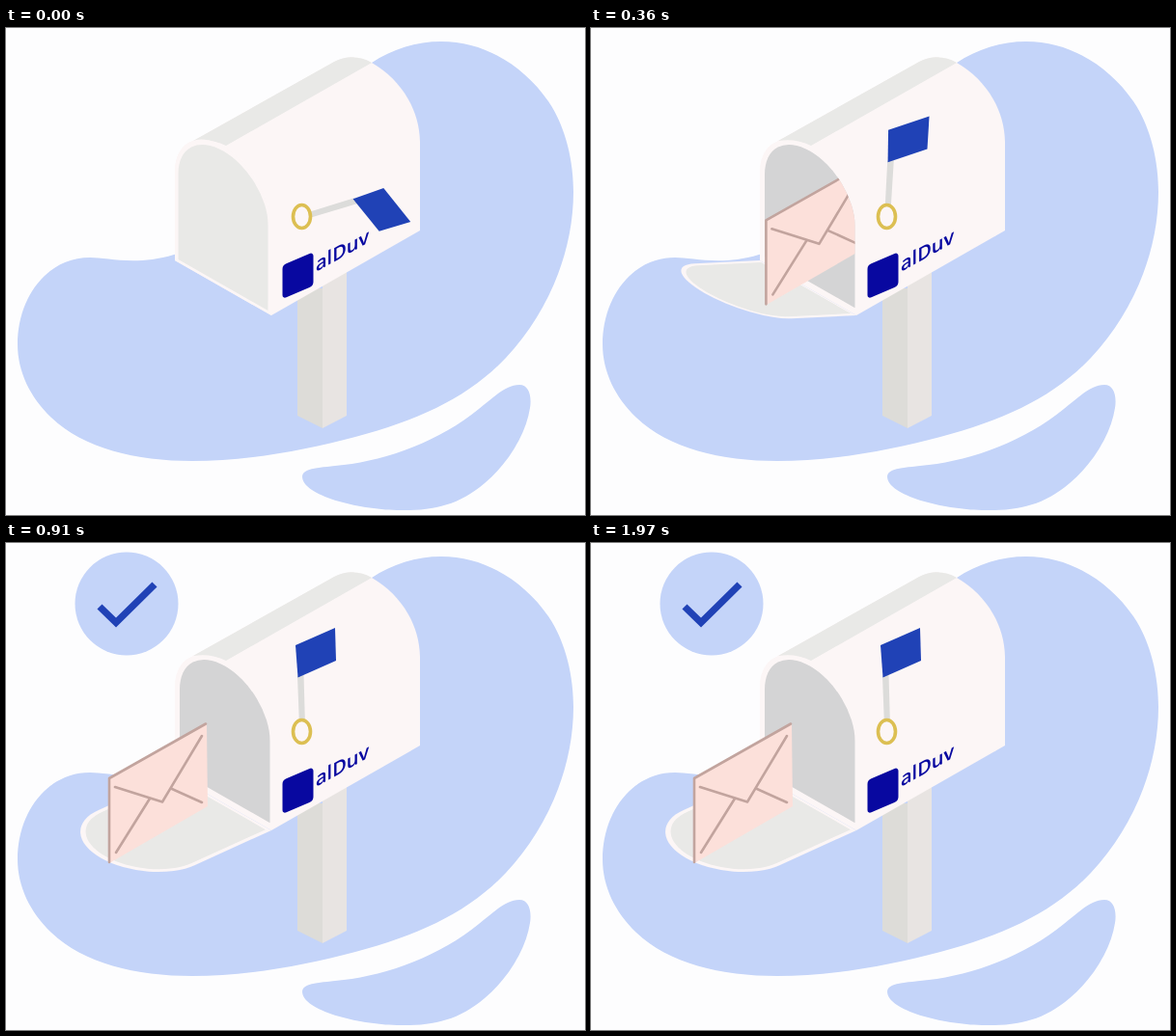
An HTML page that plays this animation: 600 by 505 pixels, repeating every 2000 ms.

```html
<!DOCTYPE html>
<html lang="en">
<head>
<meta charset="utf-8">
<title>Mailbox</title>
<style>
  html, body { margin: 0; width: 100%; height: 100%; overflow: hidden; background: #fdfdfe; }
  svg { display: block; width: 100vw; height: 100vh; }
  .sky { fill: #c4d4f9; }
  .shell { fill: #fcf6f6; }
  .shade { fill: #e9e9e7; }
  .ink { fill: #2042b6; }
  .crease { fill: none; stroke: #c2a49e; stroke-width: 2.6; stroke-linecap: round; stroke-linejoin: round; }
  text { font: 600 20px "Open Sans", "Noto Sans", sans-serif; fill: #0808a0; }
</style>
</head>
<body>
<svg viewBox="0 0 600 505">
  <defs>
    <clipPath id="mouth">
      <path transform="matrix(1 .57 0 -1 175 241)" d="M98.5 -200V92A46.75 51 0 0 1 5 92H-150V-200Z"/>
    </clipPath>
  </defs>

  <path class="sky" d="M379 36C400 22 425 14 451 14C497 14 537 40 562 76C581 104 588 140 588 170C588 232 562 295 518 342C480 382 430 406 362 424C310 438 250 449 193 449C135 449 80 436 47 404C25 383 12 356 12 328C12 280 42 238 87 238C105 238 135 247 174 235L300 200Z"/>
  <path class="sky" d="M307 465C308 456 325 456 350 453C395 448 450 428 490 395C505 383 518 370 532 370C542 370 545 382 543 394C539 420 522 450 496 472C468 496 440 501 405 500C365 499 307 485 307 465Z"/>

  <path fill="#dddcd8" d="M302 270H328V415L302 402Z"/>
  <path fill="#e8e4e2" d="M328 250H353V402L328 415Z"/>

  <path class="shell" d="M175 241V149C175 133 182 122 192 118L340 35C352 28 368 29 379 36C412 55 429 88 429 118V210L275 298Z"/>
  <path class="shade" d="M194 117L340 35C352 28 368 29 379 36L228 122Q212 114 194 117Z"/>
  <path fill="#d4d4d5" transform="matrix(1 .57 0 -1 175 241)" d="M5 7V92A46.75 51 0 0 0 98.5 92V7Z"/>

  <g id="front">
    <g id="door">
      <path class="shell" d="M0 0V92A50 55 0 0 0 100 92V0Z"/>
      <path class="shade" d="M3.5 3V92A46.5 50 0 0 0 96.5 92V3Z"/>
    </g>
    <g id="mail" clip-path="url(#mouth)">
      <g id="letter">
        <path fill="#fce0da" d="M107 244L208 187L209 273L107 332Z"/>
        <path class="crease" d="M107 331V244L207 187.500M113 253L162 268.500L203 200M114 321L149 265M172 255L203 269"/>
      </g>
    </g>
  </g>

  <g id="flag">
    <path fill="#dcdcda" d="M302 138L308.500 136L310 190H304Z"/>
    <path class="ink" d="M300 106L341 88L342 122L302.500 139.500Z"/>
  </g>
  <ellipse cx="306.500" cy="195.500" rx="9" ry="12" fill="#fcf6f6" stroke="#dcbf52" stroke-width="3.6"/>

  <rect width="32" height="35" rx="4" fill="#0808a0" transform="matrix(1 -.43 0 1 286.500 246)"/>
  <text transform="matrix(1 -.56 0 1 321 253)">alDuv</text>

  <g id="badge">
    <circle class="sky" cx="125" cy="63" r="53.500"/>
    <path fill="none" stroke="#2042b6" stroke-width="7.200" d="M97 66L114 82.500L154 43"/>
  </g>
</svg>
<script>
const LOOP = 2000;
const [front, door, mail, letter, flag, badge] =
  ["front", "door", "mail", "letter", "flag", "badge"].map(id => document.getElementById(id));

const smooth = (t, from, to) => {
  const p = Math.min(1, Math.max(0, (t - from) / (to - from)));
  return p * p * (3 - 2 * p);
};

// Smooth curve through [time, value] keys, at rest at both ends.
function track(...keys) {
  const slope = i => keys[i - 1] && keys[i + 1]
    ? (keys[i + 1][1] - keys[i - 1][1]) / (keys[i + 1][0] - keys[i - 1][0]) : 0;
  return t => {
    const i = keys.findIndex(k => k[0] > t);
    if (i < 0) return keys[keys.length - 1][1];
    const [t0, a] = keys[i - 1], [t1, b] = keys[i];
    const d = t1 - t0, p = (t - t0) / d, q = 1 - p;
    return a * q * q * (1 + 2 * p) + b * p * p * (3 - 2 * p)
      + d * p * q * (q * slope(i - 1) - p * slope(i));
  };
}

const doorX = track([0, 0], [120, -.09], [240, -.36], [360, -.73], [450, -.85], [550, -.86]);
const doorY = track([0, -1], [120, -.93], [240, -.69], [360, .03], [450, .335], [550, .39]);
const inside = track([0, 230], [120, 205], [240, 148], [360, 75], [450, 23], [520, 6], [600, 0]);

function draw(t) {
  door.setAttribute("transform", `matrix(1 .57 ${doorX(t)} ${doorY(t)} 175 241)`);
  // The letter slides out over the door once it has dropped.
  if (t < 250) front.append(mail, door);
  else front.append(door, mail);

  const x = inside(t);
  letter.setAttribute("transform", `translate(${x} ${-.6 * x})`);
  flag.setAttribute("transform", `rotate(${75 * (1 - smooth(t, 0, 430))} 306.5 195.5)`);

  const size = smooth(t, 570, 830);
  badge.setAttribute("transform", `translate(125 116.5) scale(${size}) translate(-125 -116.5)`);
}

const start = performance.now();
function tick() {
  draw((performance.now() - start) % LOOP);
  requestAnimationFrame(tick);
}
tick();
</script>
</body>
</html>
```
